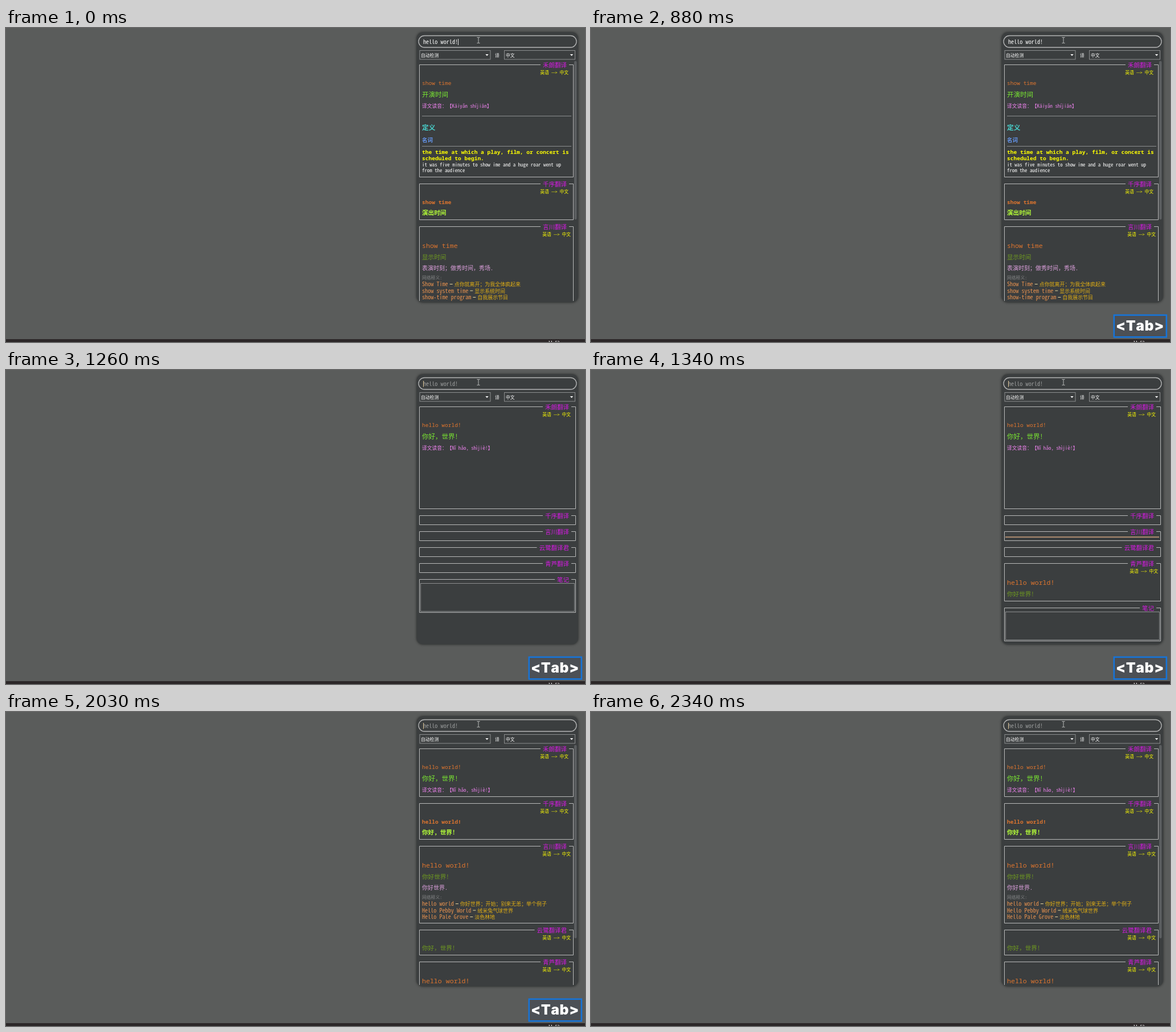
Recreate the animation shown at these times as an HTML page. Size 1016 by 551 pixels, loop 2.57 s.

```html
<!DOCTYPE html>
<html>
<head>
<meta charset="utf-8">
<title>Translator panel</title>
<style>
  html, body { margin: 0; width: 100%; height: 100%; overflow: hidden; background: #5a5c5b; }
  svg { display: block; width: 1016px; height: 551px; }
  text {
    font-family: "Noto Sans Mono CJK SC", "Noto Sans CJK SC", "Noto Sans CJK", monospace;
    white-space: pre; font-kerning: none; text-spacing-trim: space-all;
  }
  .wide { font-family: "Noto Sans Mono", "DejaVu Sans Mono", monospace; }
  .key { font-family: Inter, "Open Sans", sans-serif; font-weight: 900; letter-spacing: .7px; }
  .b { font-weight: 700; }
  .panel { filter: drop-shadow(0 0 2px rgba(0, 0, 0, .55)); }
  .frame { fill: none; stroke: #b9baba; }
  .dim { fill: none; stroke: #8c8e8f; }
</style>
</head>
<body>
<svg id="stage" viewBox="0 0 1016 551" xmlns="http://www.w3.org/2000/svg"></svg>
<script>
const LOOP = 2570;
const ORANGE = '#dd752f', GREEN = '#7bea32', LIME = '#b4ff38', OLIVE = '#6f9a20',
      MAUVE = '#dda0dd', PINK = '#ee82ee', SAND = '#e8924f', GOLD = '#e0ae14',
      YELLOW = '#ffff00', MAGENTA = '#d51be2';

const text = (x, y, size, fill, str, extra = '') =>
  `<text x="${x}" y="${y}" font-size="${size}" fill="${fill}" ${extra}>${str}</text>`;
const bold = 'class="b"', wide = 'class="wide"', wideBold = 'class="wide b"', end = 'text-anchor="end"';
const rect = (x, y, w, h, extra) => `<rect x="${x}" y="${y}" width="${w}" height="${h}" ${extra}/>`;
const rule = y => rect(730, y, 262, 1, 'fill="#8c8e8f"');
const lang = (right, y) => text(right, y + 16.3, 7.8, YELLOW, '英语 —> 中文', end);

// Titled frame with a gap in its top edge
function group(y, h, right, title) {
  const r = right - 11.5, gap = r - title.length * 10.5 - 4;
  return `<path class="frame" d="M${gap} ${y - .5}H725.5v${h}H${right}v${-h}H${r + 4}"/>` +
    text(r, y + 3.6, 10.5, MAGENTA, title, end);
}

// Frames one below the other: [title, height, body(y, right)]
function stack(right, items) {
  let y = 65, out = '';
  for (const [title, h, body] of items) {
    out += group(y, h, right, title) + (body ? body(y, right) : '');
    y += h + 12;
  }
  return out;
}

const first = (word, tr, sound, more = '') => (y, r) =>
  lang(r - 8.5, y) + text(730, y + 35, 9.55, ORANGE, word, wide) +
  text(730, y + 56.3, 11.5, GREEN, tr) +
  text(730, y + 75.2, 8.78, PINK, `译文读音：【${sound}】`) + more;

const second = (word, tr) => (y, r) =>
  lang(r - 8.5, y) + text(730, y + 35, 9.55, ORANGE, word, wideBold) +
  text(730, y + 54, 10.6, LIME, tr, bold);

const plain = (word, tr) => (y, r) =>
  lang(r - 4.5, y) + text(730, y + 37, 11.6, ORANGE, word, wide + ' font-weight="500"') +
  text(730, y + 57.3, 10.6, OLIVE, tr);

const third = (word, tr, sense, pairs) => (y, r) =>
  plain(word, tr)(y, r) + text(730, y + 76.3, 10, MAUVE, sense) +
  text(730, y + 92, 7.8, '#808283', '网络释义:', 'font-weight="300"') +
  pairs.map(([en, zh], i) => {
    const by = y + 104 + i * 11.5, x = 730 + en.length * 5.08;
    return text(730, by, 10.16, SAND, en) +
      rect(x + 3, by - 4, 5, 1, 'fill="#e8d9a0"') + text(x + 11, by, 8.95, GOLD, zh);
  }).join('');

const fourth = tr => (y, r) => lang(r - 4.5, y) + text(730, y + 35, 10.6, OLIVE, tr);
const notes = (y, r) => rect(727.5, y + 6.5, r - 729.5, 49, 'class="dim"');

const NAMES = ['禾朗翻译', '千序翻译', '言川翻译', '云鹭翻译君', '青芦翻译', '笔记'];
const entry = (i, h = 16, body) => [NAMES[i], h, body];
const bar = h => rect(997, 58, 4.5, h, 'rx="2" fill="#5b5e60"');

const definition =
  rule(154) + text(730, 179.4, 11.7, '#48d1cc', '定义', bold) +
  text(730, 199.6, 9.5, '#6495ed', '名词', bold) + rule(207) +
  text(730, 220.5, 9.55, YELLOW, 'the time at which a play, film, or concert is', wideBold) +
  text(730, 232, 9.55, YELLOW, 'scheduled to begin.', wideBold) +
  text(730, 242.5, 8.9, '#fff', 'it was five minutes to show ime and a huge roar went up') +
  text(730, 252.7, 8.9, '#fff', 'from the audience');

const oldResult = bar(278) + stack(995.5, [
  entry(0, 197, first('show time', '开演时间', 'Kāiyǎn shíjiān', definition)),
  entry(1, 63, second('show time', '演出时间')),
  entry(2, 160, third('show time', '显示时间', '表演时刻；做秀时间，秀场.', [
    ['Show Time', '点你就离开；为我全体疯起来'],
    ['show system time', '显示系统时间'],
    ['show-time program', '自我展示节目']]))
]);

const word = 'hello world!';
const hello = first(word, '你好，世界!', 'Nǐ hǎo, shìjiè!');
const short = plain(word, '你好世界!');

const newResult = bar(339) + stack(995.5, [
  entry(0, 84, hello),
  entry(1, 63, second(word, '你好，世界!')),
  entry(2, 135, third(word, '你好世界!', '你好世界.', [
    ['hello world', '你好世界；开始；别来无恙；举个例子'],
    ['Hello Pebby World', '绒米兔气球世界'],
    ['Hello Pale Grove', '淡色林地']])),
  entry(3, 44, fourth('你好，世界!')),
  entry(4, 66, short)
]);

// Results arriving one by one
const loading = (a, c, e) => stack(999.5, [
  a ? entry(0, 179, hello) : entry(0), entry(1),
  entry(2, 16, c && (y => rect(727, y + 8.5, 270, 1.3, 'fill="#e6b288"'))),
  entry(3), e ? entry(4, 66, short) : entry(4), entry(5, 58, notes)
]);
const specks = rect(727, 73, 1, 1, 'fill="#8c8e8f"') + rect(727, 186, 3, 1.3, 'fill="#ddd"');

const caret = (x, fill) => rect(x, 19, 1, 11, `fill="${fill}"`);
const query = fill => text(732, 28, 10.2, fill, word);
const arrow = x => `<path d="M${x - 2.7} 46h5.4l-2.7 3z" fill="#fff"/>`;

// Visible spans in ms: [markup, from, to, ...]
const body = [
  [oldResult, 0, 960],
  [loading(), 960, 1200],
  [specks, 1030, 1200],
  [loading(1), 1200, 1270],
  [loading(1, 0, 1), 1270, 1340],
  [loading(1, 1, 1), 1340, 1420],
  [newResult, 1420, LOOP]
];
const field = [
  [query('#fff'), 0, 960],
  [query('#9c9e9e'), 960, LOOP],
  [caret(793, '#e4e4e4'), 0, 480],
  [caret(732, '#c9b184'), 960, 1500, 2030, LOOP]
];
const layer = ([markup, ...spans]) => `<g data-spans="${spans}">${markup}</g>`;

document.getElementById('stage').innerHTML =
  '<clipPath id="view"><rect x="721" y="57" width="283" height="422"/></clipPath>' +
  rect(0, 0, 1016, 551, 'fill="#5a5c5b"') +
  rect(0, 546, 1016, 5, 'fill="#2c2728"') +
  text(951.5, 555.3, 8, '#fff', '11:52') +
  rect(720.5, 7.5, 283.5, 474, 'rx="11" fill="#3b3e3f" class="panel"') +
  rect(724, 13.5, 277, 20.5, 'rx="10.2" fill="#3b3e3f" stroke="#b4b5b5" stroke-width="1.3"') +
  rect(726, 39.5, 124, 15.5, 'class="dim"') + rect(874.5, 39.5, 124, 15.5, 'class="dim"') +
  text(728, 50.9, 7.8, '#fff', '自动检测') + text(858, 50.9, 7.8, '#fff', '译') +
  text(877, 50.9, 7.8, '#fff', '中文') + arrow(844) + arrow(992.5) +
  `<g clip-path="url(#view)">${body.map(layer).join('')}</g>` +
  field.map(layer).join('') +
  '<path d="M826.5 16.5h1.7l.8.6.8-.6h1.7M829 17v9M826.5 26.5h1.7l.8-.6.8.6h1.7" fill="none" stroke="#c9caca" stroke-width=".9"/>' +
  '<g id="tab">' +
  rect(917.8, 503.8, 92, 38.5, 'fill="#4c5055" stroke="#1674d8" stroke-width="2.6"') +
  text(963.4, 530.5, 24.6, '#fff', '&lt;Tab&gt;', 'class="key" text-anchor="middle"') + '</g>';

const layers = [...document.querySelectorAll('[data-spans]')].map(el =>
  ({ el, spans: el.dataset.spans.split(',').map(Number) }));
const tab = document.getElementById('tab');

function tabOpacity(t) {
  if (t < 880 || t >= 2340) return 0;
  return t < 2120 ? 1 : t < 2190 ? .75 : t < 2270 ? .5 : .25;
}

const start = performance.now();
function draw() {
  const t = Math.max(0, performance.now() - start) % LOOP;
  for (const { el, spans } of layers) {
    const on = spans.some((from, i) => i % 2 === 0 && t >= from && t < spans[i + 1]);
    el.style.display = on ? '' : 'none';
  }
  tab.style.opacity = tabOpacity(t);
  requestAnimationFrame(draw);
}
draw();
</script>
</body>
</html>
```
